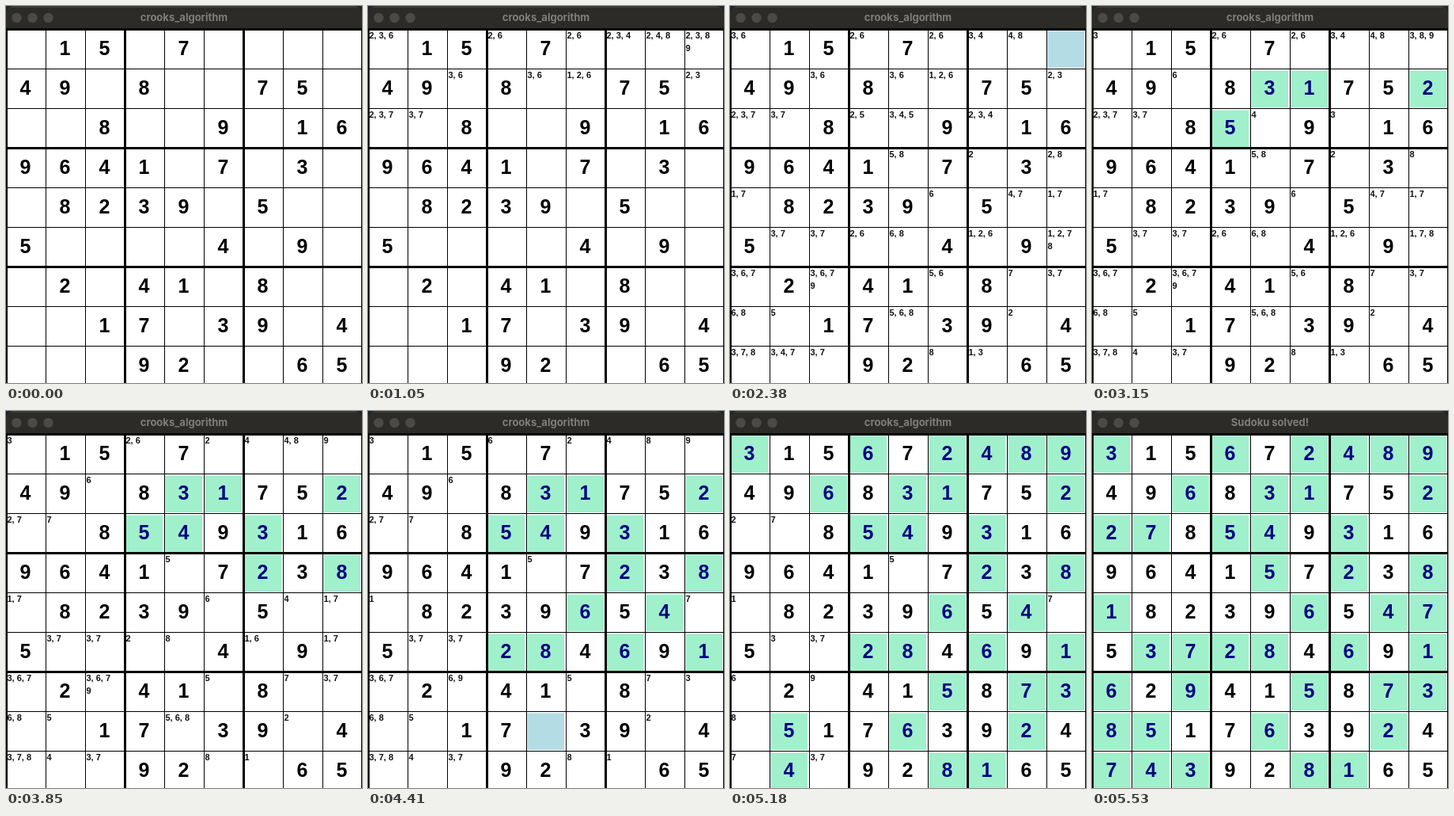
Write an HTML page with a canvas that moves like this. It is 450x476 px and loops after 5.67 s.

```html
<!DOCTYPE html>
<html lang="en">
<head>
<meta charset="utf-8">
<title>Sudoku solver</title>
<style>
  html, body { margin: 0; overflow: hidden; background: #fff; }
  canvas { display: block; }
</style>
</head>
<body>
<canvas id="stage" width="450" height="476"></canvas>
<script>
const ctx = document.getElementById('stage').getContext('2d');

const PUZZLE = [
  '.15.7....', '49.8..75.', '..8..9.16',
  '9641.7.3.', '.8239.5..', '5....4.9.',
  '.2.41.8..', '..17.39.4', '...92..65'
].join('');

// Timing: ticks of 70 ms after an opening pause; costs are in ticks.
const LOOP = 5670, PAUSE = 560, TICK = 70;
const COST = { mark: 0.5864, erase: 0.61, place: 0.328 };
const GLOW = 0.8;      // share of a step during which its cell is lit
const FIRST_GLOW = 8;  // no cell is lit before this tick

const cells = [...Array(81).keys()];
const row = i => Math.floor(i / 9);
const col = i => i % 9;
const box = i => Math.floor(row(i) / 3) * 3 + Math.floor(col(i) / 3);
const unitsOf = i => [row, col, box].map(group =>
  cells.filter(j => j !== i && group(j) === group(i)));

const given = [...PUZZLE].map(ch => ch === '.' ? '' : ch);
const { events, solvedAt } = solve();

// Runs Crook's algorithm and records every visible change with its time.
function solve() {
  const events = [];
  const open = cells.map(i => given[i] ? null : '');
  let clock = -GLOW * COST.mark;

  const record = (at, cell, kind, text) => events.push({ at, cell, kind, text });

  function note(cell, marks, cost) {
    if (clock > FIRST_GLOW) record(clock, cell, 'glow', '');
    record(clock + GLOW * cost, cell, 'marks', marks);
    open[cell] = marks;
    clock += cost;
  }

  function erase(cell, digit) {
    if (open[cell] && open[cell].includes(digit))
      note(cell, open[cell].replace(digit, ''), COST.erase);
  }

  function place(cell) {
    const digit = open[cell];
    for (const unit of unitsOf(cell)) unit.forEach(j => erase(j, digit));
    clock += COST.place;
    record(clock, cell, 'placed', digit);
    open[cell] = null;
  }

  function clearPair(cell) {
    const pair = open[cell];
    for (const unit of unitsOf(cell)) {
      if (!unit.some(j => open[j] === pair)) continue;
      for (const digit of pair)
        unit.filter(j => open[j] !== pair).forEach(j => erase(j, digit));
    }
  }

  const blanks = cells.filter(i => !given[i]);
  for (const i of blanks) {
    const seen = unitsOf(i).flat().map(j => given[j]);
    const marks = [...'123456789'].filter(d => !seen.includes(d)).join('');
    note(i, marks, COST.mark);
  }
  for (let pass = 0; pass < 9 && open.some(Boolean); pass++) {
    for (const i of blanks) {
      if (!open[i]) continue;
      if (open[i].length === 1) place(i);
      else if (open[i].length === 2) clearPair(i);
    }
  }
  return { events, solvedAt: clock };
}

function write(text, x, y, font, color, align) {
  ctx.font = font;
  ctx.fillStyle = color;
  ctx.textAlign = align;
  ctx.fillText(text, x, y);
}

function drawCell(i, kind, text) {
  const x = col(i) * 50, y = 30 + row(i) * 50;
  if (kind === 'glow' || kind === 'placed') {
    ctx.fillStyle = kind === 'glow' ? '#b3dce4' : '#a0f0cc';
    ctx.fillRect(x + 1.5, y + 1.5, 46.5, 46.5);
  }
  if (kind === 'marks') {
    const font = 'bold 11px "Liberation Sans", Arial, sans-serif';
    const lines = [text.slice(0, 3), text.slice(3)];
    lines.forEach((line, n) =>
      write([...line].join(', '), x + 1.5, y + 11 + 16 * n, font, '#111', 'left'));
  } else {
    const color = kind === 'placed' ? '#000080' : '#000';
    write(text, x + 24.5, y + 32, 'bold 25px "Liberation Sans", Arial, sans-serif', color, 'center');
  }
}

function drawGrid() {
  ctx.fillStyle = '#000';
  for (let n = 0; n <= 9; n++) {
    const thick = n % 3 === 0;
    const width = thick ? 3 : 1, shift = thick ? 1 : 0;
    ctx.fillRect(n * 50 - shift, 29, width, 447);
    ctx.fillRect(0, 29 + n * 50 - shift, 450, width);
  }
}

function drawTitleBar(title) {
  ctx.fillStyle = '#1d232b';
  ctx.fillRect(0, 0, 450, 29);
  ctx.fillStyle = '#55544f';
  ctx.beginPath();
  ctx.roundRect(0, 0.5, 450, 40, 9);
  ctx.save();
  ctx.clip();
  ctx.fillRect(0, 0, 450, 3);
  ctx.fillStyle = '#2c2b27';
  ctx.fillRect(0, 1.5, 450, 27.5);
  ctx.restore();
  ctx.fillStyle = '#4b4a47';
  for (const x of [13.5, 33.5, 53.5]) {
    ctx.beginPath();
    ctx.arc(x, 15, 6.2, 0, 7);
    ctx.fill();
  }
  write(title, 225, 19, 'bold 13px Inter, sans-serif', '#7f7e7a', 'center');
}

function draw(time) {
  const tick = Math.floor((time % LOOP - PAUSE) / TICK);
  const board = given.map(text => ({ kind: 'given', text }));
  if (tick >= 0)
    for (const e of events) if (e.at <= tick) board[e.cell] = e;

  ctx.fillStyle = '#fff';
  ctx.fillRect(0, 0, 450, 476);
  board.forEach((cell, i) => drawCell(i, cell.kind, cell.text));
  drawTitleBar(tick >= solvedAt ? 'Sudoku solved!' : 'crooks_algorithm');
  drawGrid();
}

function frame() {
  draw(performance.now());
  requestAnimationFrame(frame);
}
frame();
</script>
</body>
</html>
```
